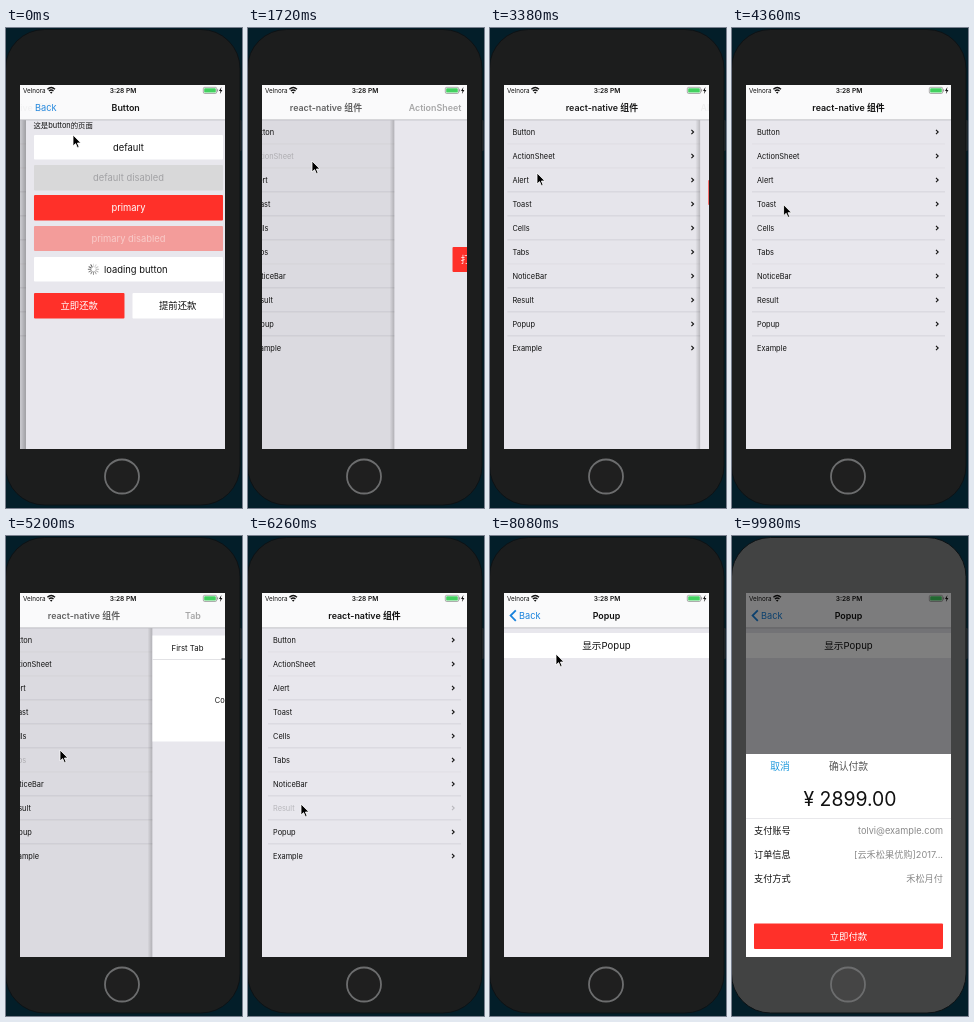
Write an HTML page that moves like this. It is 236x480 px and loops after 10000 ms.

```html
<!DOCTYPE html>
<html lang="zh-CN">
<head>
<meta charset="utf-8">
<title>Component demo</title>
<style>
html, body { margin: 0; width: 100%; height: 100%; overflow: hidden; background: #031e29; }
svg { display: block; width: 100%; height: 100%; }
text { font-family: Inter, "Noto Sans CJK SC", "Noto Sans CJK", sans-serif; white-space: pre; }
</style>
</head>
<body>
<svg id="stage" viewBox="0 0 236 480"></svg>
<script>
const LOOP = 10000, SLIDE = 300;
const X = 14, W = 205, MID = 116.5;
const RED = '#ff3029', BG = '#e8e7ed', BLUE = '#1882dc';

const rect = (x, y, w, h, fill, more = '') =>
  `<rect x="${x}" y="${y}" width="${w}" height="${h}" fill="${fill}" ${more}/>`;
const text = (s, x, y, size, fill = '#111', anchor = 'start', more = '') =>
  `<text x="${x}" y="${y}" dy=".36em" font-size="${size}" fill="${fill}" text-anchor="${anchor}" ${more}>${s}</text>`;
const button = (s, x, y, w, h, fill, color) =>
  rect(x, y, w, h, fill, 'rx="1"') + text(s, x + w / 2, y + h / 2, 9.4, color, 'middle');
const group = (id, body, more = '') => `<g id="${id}" ${more}>${body}</g>`;

// List rows
const items = ['Button', 'ActionSheet', 'Alert', 'Toast', 'Cells', 'Tabs', 'NoticeBar', 'Result', 'Popup', 'Example'];
const faintLines = [0, 1, 5];
const rows = items.map((name, i) => {
  const y = 104 + 24 * i;
  const line = i < items.length - 1
    ? rect(20, y + 11.5, 193, 0.8, '#cfced5', `opacity="${faintLines.includes(i) ? 0.4 : 1}"`) : '';
  return group('row' + i, text(name, 25, y, 7.4) +
    `<path d="M204 ${y - 2.2}l2.2 2.2l-2.2 2.2" fill="none" stroke="#111" stroke-width="1.1"/>`) + line;
}).join('');

// Pages, in coordinates local to the screen's left edge
const spokes = Array.from({ length: 12 }, (_, i) =>
  `<path d="M0 -2.6V-5.2" transform="rotate(${i * 30})" stroke="#555" stroke-width="1" stroke-linecap="round" opacity="${0.2 + i * 0.07}"/>`).join('');

const buttonPage =
  text('这是button的页面', 7.5, 97, 7.4) +
  button('default', 8, 107, 189, 24.5, '#fff', '#111') +
  button('default disabled', 8, 137, 189, 25.5, '#d8d8d9', '#a2a2a5') +
  button('primary', 8, 167, 189, 25.5, RED, '#fff') +
  button('primary disabled', 8, 198, 189, 25, '#f39c9a', '#f9cbc9') +
  rect(8, 229, 189, 24.5, '#fff', 'rx="1"') + text('loading button', 78, 241.3, 9.4) +
  `<g transform="translate(67.5 241.3)"><g id="spinner">${spokes}</g></g>` +
  button('立即还款', 8, 265, 90.5, 25.5, RED, '#fff') +
  button('提前还款', 106.5, 265, 90.5, 25.5, '#fff', '#111');

const tabsPage =
  rect(0, 99.5, W, 106, '#fff') +
  ['First Tab', 'Second Tab', 'Third Tab'].map((s, i) => text(s, 35 + 68 * i, 112, 7.8, '#111', 'middle')).join('') +
  rect(0, 123, W, 0.7, '#d6d6da') + rect(69, 122.4, 67, 1.2, '#333') +
  text('Content of Second Tab', W / 2, 164.5, 7.4, '#111', 'middle');

const popupPage = rect(0, 97, W, 25, '#fff') + text('显示Popup', 102.5, 110, 9.6, '#111', 'middle');

// in / out: when the page starts to slide on and off
const visits = [
  { row: 0, title: 'Button', in: -175, out: 900, body: buttonPage },
  { row: 1, title: 'ActionSheet', in: 1690, out: 2260, body: button('打开ActionSheet', 58, 219, 89, 25, RED, '#fff') },
  { row: 2, title: 'Alert', in: 2650, out: 3217, body: button('显示Alert', 8, 152, 189, 25, RED, '#fff') },
  { row: 5, title: 'Tab', in: 5170, out: 5790, body: tabsPage },
  { row: 7, title: 'Result', in: 6290, out: 7090, body: '' },
  { row: 8, title: 'Popup', in: 7620, out: Infinity, body: popupPage }
];

const title = (id, s) => group(id, text(s, MID, 80, 8.9, '#111', 'middle', 'font-weight="600"'));

const statusBar =
  text('Velnora', 17, 62.5, 6.3) +
  `<g fill="none" stroke="#111" stroke-width="1.3"><path d="M41.4 61.2Q45.2 57.8 49 61.2M42.9 63Q45.2 61 47.5 63"/></g>` +
  `<path d="M43.9 64.2Q45.2 63.2 46.5 64.2L45.2 65.8Z" fill="#111"/>` +
  text('3:28 PM', 117, 62.5, 6.6, '#111', 'middle', 'font-weight="600"') +
  rect(197.3, 59.3, 13.4, 6.2, '#fff', 'rx="1.4" stroke="#777" stroke-width=".6"') +
  rect(198.2, 60.2, 11.6, 4.4, '#43d160', 'rx=".7"') + rect(211.3, 61.3, 0.8, 2.2, '#777') +
  `<path d="M215.4 59L213 62.9H214.5L213.9 66L216.4 61.9H214.9Z" fill="#111"/>`;

const details = [['支付账号', 'tolvi@example.com'], ['订单信息', '[云禾松果优购]2017...'], ['支付方式', '禾松月付']];
const sheet =
  rect(X, 218, W, 204, '#fff') +
  text('取消', 48, 230.5, 9.8, '#1a98dc', 'middle') +
  text('确认付款', MID, 230.5, 9.8, '#555', 'middle') +
  text('¥ 2899.00', 118, 263, 19.4, '#111', 'middle') +
  rect(X, 282, W, 0.7, '#dedee2') +
  details.map(([k, v], i) => text(k, 22, 295 + 24 * i, 9.2) + text(v, 211, 295 + 24 * i, 9.2, '#8a8a8a', 'end')).join('') +
  button('立即付款', 22, 387.5, 189, 25.5, RED, '#fff');

document.getElementById('stage').innerHTML = `
<defs>
  <clipPath id="screen">${rect(X, 57, W, 364, '#000')}</clipPath>
  <linearGradient id="edge"><stop offset="0" stop-color="#000" stop-opacity="0"/><stop offset="1" stop-color="#000" stop-opacity=".2"/></linearGradient>
</defs>
${rect(0, 0, 236, 480, '#031e29')}
${rect(232, 92, 3.5, 31, '#333538', 'rx="1"')}
${rect(-0.5, 1.5, 234.5, 475.5, '#1c1d1e', 'id="body" rx="39" stroke="#0d1215" stroke-width="1"')}
<circle cx="116" cy="448.5" r="17" fill="#202122" stroke="#6c6d6e" stroke-width="1.8" id="home"/>
<g clip-path="url(#screen)">
  ${rect(X, 57, W, 364, BG)}
  ${group('list', rows)}
  ${rect(X, 92, W, 329, '#000', 'id="shade"')}
  ${visits.map((v, i) => group('page' + i, rect(-5, 92, 5, 329, 'url(#edge)') + rect(0, 92, W, 329, BG) + v.body)).join('')}
  ${rect(X, 57, W, 35, '#fafafb')}
  ${rect(X, 91.5, W, 0.8, '#b4b4b8')}
  ${statusBar}
  ${title('home-title', 'react-native 组件')}
  ${visits.map((v, i) => title('title' + i, v.title)).join('')}
  ${group('back', text('Back', 29, 80, 9.2, BLUE))}
  <path id="chevron" d="M25.8 74.3L20.6 79.6L25.8 84.9" fill="none" stroke="${BLUE}" stroke-width="1.8"/>
  ${rect(X, 57, W, 364, '#000', 'id="dim"')}
  ${group('sheet', sheet)}
</g>
<path id="cursor" d="M0 0V11L2.6 8.6L4.4 12.7L6.1 12L4.4 8H7.9Z" fill="#000" stroke="#fff" stroke-width=".8"/>`;

const el = Object.fromEntries([...document.querySelectorAll('#stage [id]')].map(n => [n.id, n]));
const clamp = v => Math.min(1, Math.max(0, v));
const mix = (a, b, u) => a + (b - a) * u;
const smooth = u => u * u * (3 - 2 * u);
const slideEase = ms => 1 - (1 - clamp(ms / SLIDE)) ** 4;
const move = (n, x, y = 0) => n.setAttribute('transform', `translate(${x} ${y})`);
const fade = (n, o) => n.setAttribute('opacity', o);

// Cursor stops: ms, x, y
const stops = [
  [0, 67, 107], [350, 72, 112], [800, 36, 80], [950, 36, 80],
  [1500, 64, 133], [1780, 64, 133], [2180, 36, 79], [2300, 36, 79],
  [2560, 50, 148], [2720, 50, 148], [3100, 36, 79], [3230, 36, 79],
  [3380, 47, 145], [3800, 50, 152], [5100, 54, 214], [5250, 54, 214],
  [5680, 36, 79], [5830, 36, 79], [6180, 53, 268], [6330, 53, 268],
  [6980, 36, 79], [7130, 36, 79], [7540, 52, 292], [7690, 52, 292],
  [8000, 66, 118], [8400, 66, 118], [8900, 110, 230], [9740, 170, 486]
];

function cursorAt(t) {
  const i = stops.findIndex(s => s[0] > t);
  if (i < 0) return stops[stops.length - 1].slice(1);
  const a = stops[i - 1], b = stops[i], u = smooth((t - a[0]) / (b[0] - a[0]));
  return [mix(a[1], b[1], u), mix(a[2], b[2], u)];
}

function rowOpacity(t, start) {
  const d = t - start;
  if (d < -50) return mix(1, 0.22, clamp((d + 80) / 30));
  return mix(0.22, 1, clamp((d - 30) / 170));
}

function render(t) {
  let shown = 0;
  visits.forEach((v, i) => {
    const p = slideEase(t - v.in) - slideEase(t - v.out);
    shown = Math.max(shown, p);
    const display = p > 0.0005 ? 'inline' : 'none';
    el['page' + i].style.display = el['title' + i].style.display = display;
    move(el['page' + i], X + W * (1 - p));
    move(el['title' + i], 109 * (1 - p));
    fade(el['title' + i], p);
    fade(el['row' + v.row], rowOpacity(t, v.in));
  });
  move(el.list, -0.3 * W * shown);
  fade(el.shade, 0.15 * shown);
  move(el['home-title'], -109 * shown);
  fade(el['home-title'], 1 - shown);
  fade(el.back, clamp(shown * 2 - 1));
  fade(el.chevron, shown > 0.985 ? 1 : 0);
  el.spinner.setAttribute('transform', `rotate(${Math.floor(t / 40) % 12 * 30})`);

  const open = slideEase(t - 8400);
  fade(el.dim, 0.5 * open);
  move(el.sheet, 0, 204 * (1 - open));

  const glow = clamp((t - 9900) / 80);
  const gray = Math.round(mix(28, 66, glow));
  el.body.setAttribute('fill', `rgb(${gray},${gray + 1},${gray + 1})`);
  el.home.setAttribute('fill', `rgb(${gray + 3},${gray + 3},${gray + 3})`);
  move(el.cursor, ...cursorAt(t));
}

const begin = performance.now();
function tick() {
  render((performance.now() - begin) % LOOP);
  requestAnimationFrame(tick);
}
tick();
</script>
</body>
</html>
```
